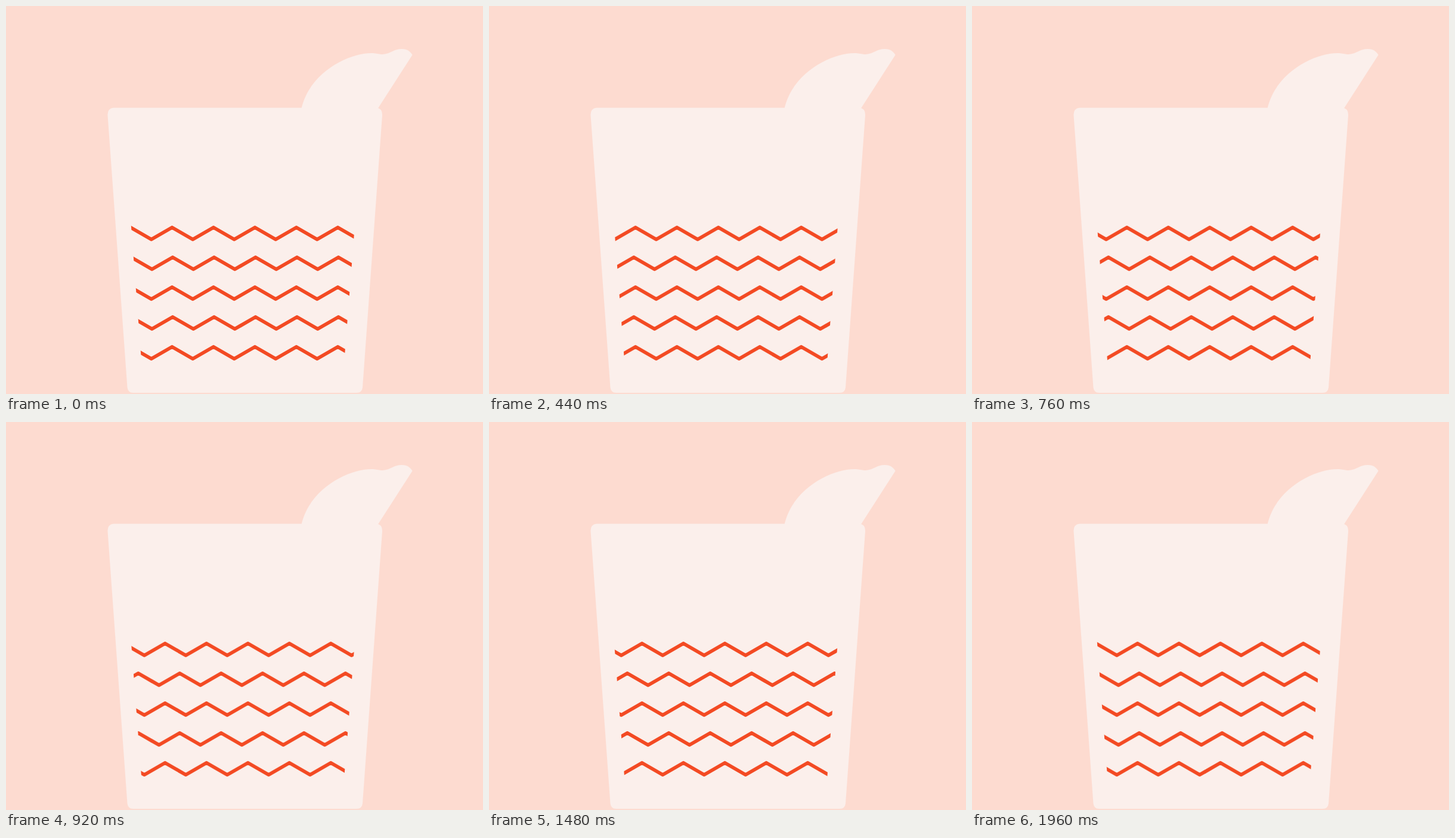
Write an HTML page without scripts that moves like this. It is 800x650 px and loops after 2000 ms.

```html
<!DOCTYPE html>
<html lang="en">
<head>
<meta charset="utf-8">
<title>Yogurt cup</title>
<style>
  html, body { margin: 0; width: 100%; height: 100%; overflow: hidden; background: #fddbd0; }
  svg { display: block; width: 800px; height: 650px; }
  .cup { fill: #fbefeb; }
  .wave { fill: none; stroke: #f34a23; stroke-width: 6; stroke-linejoin: round; }

  /* 50 steps of 15.62px; the small negative delay keeps step edges clear of the 40ms marks */
  .left, .right { animation: 2s steps(50) -4ms infinite; }
  .left { animation-name: left; }
  .right { animation-name: right; }
  @keyframes left { from { transform: translateX(0); } to { transform: translateX(-781px); } }
  @keyframes right { from { transform: translateX(0); } to { transform: translateX(781px); } }
</style>
</head>
<body>
<svg viewBox="0 0 800 650" xmlns="http://www.w3.org/2000/svg">
  <defs>
    <!-- 18 zigzags, each 69.5 wide, starting on a crest -->
    <path id="zig" d="M0-10
      l34.75 20 34.75-20 34.75 20 34.75-20 34.75 20 34.75-20
      l34.75 20 34.75-20 34.75 20 34.75-20 34.75 20 34.75-20
      l34.75 20 34.75-20 34.75 20 34.75-20 34.75 20 34.75-20
      l34.75 20 34.75-20 34.75 20 34.75-20 34.75 20 34.75-20
      l34.75 20 34.75-20 34.75 20 34.75-20 34.75 20 34.75-20
      l34.75 20 34.75-20 34.75 20 34.75-20 34.75 20 34.75-20"/>
    <clipPath id="label"><path d="M209.2 360H585.6L566.9 600H227.5Z"/></clipPath>
  </defs>

  <g class="cup">
    <path d="M495.5 172C509 111 575 79 612 79C622 79 625 81 632 81C645 80 650 72 664 72C673 72 678 76 681.5 82L623.5 172Z"/>
    <path d="M180.5 170.5H621Q631.5 171.5 631 183L598 639Q597 648 588 648H213.500Q204.500 648 203.500 639L170.500 183Q170 171.500 180.500 170.500Z"/>
  </g>

  <g class="wave" clip-path="url(#label)">
    <g class="left">
      <use href="#zig" x="139.5" y="381"/>
      <use href="#zig" x="139.5" y="481"/>
      <use href="#zig" x="139.5" y="581"/>
    </g>
    <g class="right">
      <use href="#zig" x="-624" y="431"/>
      <use href="#zig" x="-624" y="531"/>
    </g>
  </g>
</svg>
</body>
</html>
```
